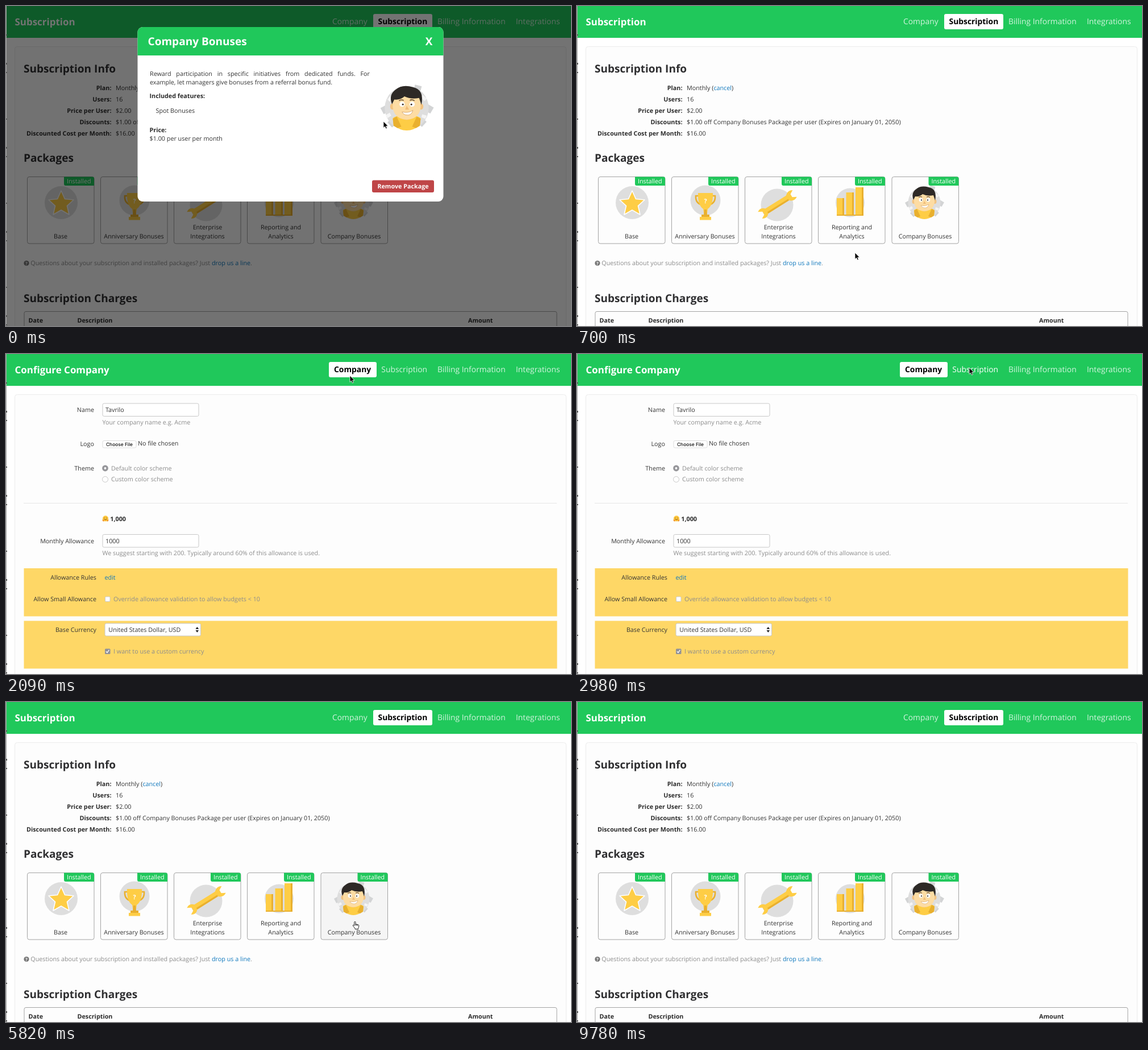
An HTML page that plays this animation: 994 by 563 pixels, repeating every 9.88 s.

```html
<!DOCTYPE html>
<html lang="en">
<head>
<meta charset="utf-8">
<title>Subscription packages</title>
<style>
html, body { margin: 0; width: 100%; height: 100%; overflow: hidden; background: #fff; }
svg { display: block; }
text, p { font: 10.78px "Open Sans", sans-serif; text-rendering: geometricPrecision; }
text { fill: #333; white-space: pre; }
p { margin: 0; color: #333; line-height: 15.4px; white-space: nowrap; }
.justify { text-align: justify; text-align-last: justify; white-space: normal; }
.b { font-weight: 700; fill: #2b2b2b; }
.end { text-anchor: end; }
.mid { text-anchor: middle; }
.h { font-size: 19.05px; font-weight: 700; fill: #2f2f31; }
.title { font-size: 16.94px; font-weight: 700; fill: #fff; }
.nav { font-size: 13.86px; fill: #d2f4de; }
.active { font-weight: 700; fill: #000; }
.over-company .to-company, .over-subscription .to-subscription { fill: #fff; }
.link { fill: #0f78bd; }
.mute { fill: #8c8c8c; }
.white { fill: #fff; }
.green { fill: #20c85b; }
.box { fill: #fff; stroke: #c8c8c8; }
.frame { fill: var(--bg, #fdfdfd); stroke: #a3a3a3; }
.over-card #bonuses { --bg: #f5f5f5; }
.disc { fill: #dedede; }
.gold { fill: #fecd45; }
.dark { fill: #e9b02f; }
.small { font: 500 8.4px Inter, sans-serif; fill: #111; }
</style>
</head>
<body>
<svg id="stage" width="994" height="563" viewBox="0 0 994 563">
<defs>
  <g id="card">
    <rect class="frame" x=".5" y=".5" width="117.5" height="117.5" rx="3.5"/>
    <path class="green" d="M65 .5H115a3 3 0 0 1 3 3V16H68a3 3 0 0 1-3-3z"/>
    <text class="white" x="70" y="12">Installed</text>
  </g>
  <g id="person">
    <g fill="#d3d4d5">
      <rect x="-30" y="-16" width="13" height="9" transform="rotate(-28)"/>
      <rect x="-31" y="-3" width="13" height="9" transform="rotate(-42)"/>
      <rect x="17" y="-18" width="13" height="9" transform="rotate(30)"/>
      <rect x="18" y="-4" width="13" height="9" transform="rotate(42)"/>
      <rect x="3" y="-32" width="9" height="11" transform="rotate(14)"/>
    </g>
    <circle class="disc" r="28.5"/>
    <path fill="#fff" opacity=".7" d="M-25-11l4-5 3 3-4 5zM21-17l5 5-3 3-5-5zM-27 9l5-3 2 4-5 3zM20 8l6 2-2 4-5-2z"/>
    <path class="gold" d="M-18 13Q-13 9 0 10 13 9 18 13L17 22Q9 29 0 29-9 29-17 22z"/>
    <path class="dark" d="M-18 14l5-3 6 13-5 2-5-3zM18 14l-5-3-6 13 5 2 5-3z"/>
    <path fill="#f3c482" d="M-6 8H6V13Q0 18-6 13z"/>
    <ellipse cx="-18.5" cy="-2" rx="3" ry="4" fill="#f3c482"/>
    <ellipse cx="18.5" cy="-2" rx="3" ry="4" fill="#f3c482"/>
    <path fill="#fddca3" d="M-18-16H18V-1Q17 9 9 13 0 17-9 13-17 9-18-1z"/>
    <path fill="#2d2926" d="M-19-5Q-24-17-14-24-6-31 8-27 23-24 19-4L16-13Q5-11-3-15-8-10-16-11z"/>
    <g fill="#fff"><circle cx="-6" cy="-5" r="3.4"/><circle cx="7" cy="-5" r="3.4"/></g>
    <g fill="#3b3027"><circle cx="-5" cy="-4.6" r="1.1"/><circle cx="6" cy="-4.6" r="1.1"/></g>
    <path fill="none" stroke="#4a3828" d="M-10-9.5q3-2 6-.4M4-10q3-1.5 6 .5"/>
    <path fill="#f0bd78" d="M0-3l3 5H-2z"/>
    <path fill="#fff" stroke="#c99255" stroke-width=".5" d="M-6 5Q2 7 8 3 6 10 0 9-4 9-6 5z"/>
  </g>
  <path id="arrow" d="M0 0V11.4L2.6 9 4.4 13 6.4 12.2 4.7 8.2H8.2z" stroke="#fff" stroke-width=".8"/>
  <path id="hand" fill="#fff" stroke="#111" stroke-width=".9" stroke-linejoin="round"
    d="M-1.2 7.5V1.5a1.1 1.1 0 0 1 2.2 0V5l1.7.1 1.7.4 1.6.5q.8.4.8 1.4l-.4 3-.9 1.7v1.5H.1v-1.4L-1.8 10-3.6 7.7q-.4-1.5 1-1.4zM1 5V7.4M2.8 5.3V7.4M4.5 5.6V7.6"/>
  <path id="radio" class="box" d="M-5 0a5 5 0 0 1 10 0a5 5 0 0 1-10 0z"/>
</defs>

<rect width="994" height="563" fill="#fff"/>
<rect class="green" width="994" height="56"/>
<rect x="15.5" y="71.5" width="970" height="510" rx="4" fill="#fdfdfd" stroke="#ececec"/>

<g id="subscription">
  <text class="title" x="15.5" y="33.5">Subscription</text>
  <rect class="white" x="646" y="14" width="104" height="27" rx="3"/>
  <text class="nav to-company" x="574" y="32">Company</text>
  <text class="nav active" x="654.5" y="32">Subscription</text>

  <text class="h" x="31" y="117">Subscription Info</text>
  <g class="end">
    <text class="b" x="185.5" y="147.5">Plan:</text>
    <text class="b" x="185.5" y="167.5">Users:</text>
    <text class="b" x="185.5" y="187.5">Price per User:</text>
    <text class="b" x="185.5" y="207.5">Discounts:</text>
    <text class="b" x="185.5" y="227.5">Discounted Cost per Month:</text>
  </g>
  <text x="193" y="147.5">Monthly (<tspan class="link">cancel</tspan>)</text>
  <text x="193" y="167.5">16</text>
  <text x="193" y="187.5">$2.00</text>
  <text x="193" y="207.5">$1.00 off Company Bonuses Package per user (Expires on January 01, 2050)</text>
  <text x="193" y="227.5">$16.00</text>

  <text class="h" x="31" y="273.5">Packages</text>
  <g transform="translate(37 300)">
    <use href="#card"/>
    <circle class="disc" cx="60" cy="46" r="29"/>
    <path class="gold" stroke="#fff" stroke-width="1.6" stroke-linejoin="round"
      d="M60 25L66.5 39.5 82 41 70.5 51.7 74 67 60 59 46 67 49.5 51.7 38 41 53.5 39.5z"/>
    <text class="mid" x="59" y="108.5">Base</text>
  </g>
  <g transform="translate(166 300)">
    <use href="#card"/>
    <circle class="disc" cx="60" cy="42" r="26.5"/>
    <path fill="none" stroke="#e9b02f" stroke-width="2.6" d="M49 34H43Q42 47 54 50M71 34H77Q78 47 66 50"/>
    <path class="gold" d="M47 29H73Q74 50 64 57L62 69H58L56 57Q46 50 47 29z"/>
    <path class="dark" d="M58 58H62L63 68H57zM53 67H67V72H53z"/>
    <path class="gold" d="M50 71H70V76.5H50z"/>
    <text class="b mid white" x="60" y="47" style="fill:#fff">?</text>
    <text class="mid" x="59" y="108.5">Anniversary Bonuses</text>
  </g>
  <g transform="translate(295 300)">
    <use href="#card"/>
    <circle class="disc" cx="57" cy="50" r="28.5"/>
    <g transform="translate(57.5 49) rotate(-32)">
      <path class="gold" d="M-22-5Q-28-12-36-7L-29-3V3L-36 7Q-28 12-22 5H21Q28 12 36 7L29 3V-3L36-7Q28-12 21-5z"/>
      <path class="dark" d="M-22 2H21V5H-22z"/>
    </g>
    <text class="mid" x="59.5" y="393" transform="translate(0 -300)">Enterprise</text>
    <text class="mid" x="59.5" y="108.5">Integrations</text>
  </g>
  <g transform="translate(424 300)">
    <use href="#card"/>
    <circle class="disc" cx="56.5" cy="46" r="25.5"/>
    <path class="gold" d="M33 38H46V67H33zM49.5 28H63V67H49.5zM66 19H80V67H66z"/>
    <path class="dark" d="M43 38H46V67H43zM60 28H63V67H60zM77 19H80V67H77zM33 67H80V69H33z"/>
    <text class="mid" x="59.5" y="93">Reporting and</text>
    <text class="mid" x="59.5" y="108.5">Analytics</text>
  </g>
  <g id="bonuses" transform="translate(553.5 300)">
    <use href="#card"/>
    <use href="#person" x="57.5" y="46"/>
    <text class="mid" x="59" y="108.5">Company Bonuses</text>
  </g>

  <circle cx="36" cy="452.5" r="4.6" fill="#777"/>
  <text class="b mid" x="36" y="455.5" style="font-size:8px;fill:#fff">?</text>
  <text class="mute" x="43.3" y="456.3">Questions about your subscription and installed packages? Just <tspan class="link">drop us a line</tspan>.</text>

  <text class="h" x="31" y="520.5">Subscription Charges</text>
  <rect class="frame" x="32" y="537.5" width="937" height="60" rx="3"/>
  <text class="b" x="39.5" y="556.8">Date</text>
  <text class="b" x="125.5" y="556.8">Description</text>
  <text class="b" x="813" y="556.8">Amount</text>
</g>

<g id="company">
  <text class="title" x="15.5" y="33.5">Configure Company</text>
  <rect class="white" x="568" y="14" width="84" height="27" rx="3"/>
  <text class="nav active" x="577" y="32">Company</text>
  <text class="nav to-subscription" x="660.3" y="32">Subscription</text>

  <text class="end" x="155" y="102">Name</text>
  <rect class="box" x="170" y="87" width="169" height="22.5" rx="2.5"/>
  <text x="175" y="102">Tavrilo</text>
  <text class="mute" x="169.5" y="123.7">Your company name e.g. Acme</text>
  <text class="end" x="155" y="162">Logo</text>
  <rect x="170" y="152.5" width="59" height="12.5" rx="2.5" fill="#fff" stroke="#dcdcdc"/>
  <text class="small mid" x="199.5" y="161.5">Choose File</text>
  <text x="232" y="161.3">No file chosen</text>
  <text class="end" x="155" y="205">Theme</text>
  <circle cx="174.5" cy="201" r="5.4" fill="#97979b"/>
  <circle class="white" cx="174.5" cy="201" r="1.9"/>
  <text class="mute" x="185" y="204.5">Default color scheme</text>
  <use href="#radio" x="174.5" y="220.5"/>
  <text class="mute" x="185" y="223.7">Custom color scheme</text>
  <path stroke="#e6e6e6" d="M31 262.5H969"/>

  <circle cx="175" cy="289.5" r="5" fill="#fdc53a"/>
  <path fill="none" stroke="#7a4b16" stroke-width=".9" d="M172.5 288.3h1.2M176.3 288.3h1.2M172.5 290.5q2.5 2.6 5 0"/>
  <path fill="#f0932b" d="M169.5 291l3 1.2v2.6l-2.5-.8zM180.5 291l-3 1.2v2.6l2.5-.8z"/>
  <text class="b" x="183.3" y="294.3">1,000</text>
  <text class="end" x="155" y="332.5">Monthly Allowance</text>
  <rect class="box" x="170" y="317.5" width="169" height="22.5" rx="2.5"/>
  <text x="175" y="332.7">1000</text>
  <text class="mute" x="169.5" y="354">We suggest starting with 200. Typically around 60% of this allowance is used.</text>

  <path fill="#fed766" d="M31.5 377H969.5V461.5H31.5zM31.5 469.5H969.5V553.5H31.5z"/>
  <text class="end" x="159" y="396.5">Allowance Rules</text>
  <text class="link" x="173.5" y="396.5">edit</text>
  <text class="end" x="159" y="435">Allow Small Allowance</text>
  <rect class="box" x="174.5" y="427" width="8.5" height="8.5" rx="1.5"/>
  <text class="mute" x="189" y="435">Override allowance validation to allow budgets &lt; 10</text>
  <text class="end" x="159" y="488.5">Base Currency</text>
  <rect class="box" x="174" y="474" width="168.5" height="22" rx="2.5"/>
  <text x="180.3" y="488.7">United States Dollar, USD</text>
  <path fill="#222" d="M333.5 484l2.8-4 2.8 4zM333.5 486l2.8 4 2.8-4z"/>
  <rect x="174" y="518.5" width="9.5" height="9.5" rx="1.5" fill="#929297"/>
  <path fill="none" stroke="#fff" stroke-width="1.3" d="M176 523.3l2 2.2 3.4-4.8"/>
  <text class="mute" x="189" y="527">I want to use a custom currency</text>
</g>

<text class="nav" x="759" y="32">Billing Information</text>
<text class="nav" x="897" y="32">Integrations</text>

<g id="modal">
  <rect width="994" height="563" opacity=".55"/>
  <rect x="231.5" y="37" width="538" height="307" rx="9" fill="#fff"/>
  <path class="green" d="M231.5 87V46a9 9 0 0 1 9-9H760.500a9 9 0 0 1 9 9V87z"/>
  <text class="h" x="249.5" y="68.500" style="fill:#fff">Company Bonuses</text>
  <text class="h mid" x="744" y="68.500" style="fill:#fff">X</text>
  <foreignObject x="253" y="111.800" width="387" height="34">
    <p class="justify">Reward participation in specific initiatives from dedicated funds. For</p>
    <p>example, let managers give bonuses from a referral bonus fund.</p>
  </foreignObject>
  <text class="b" x="252.500" y="162">Included features:</text>
  <text x="263.500" y="188">Spot Bonuses</text>
  <text class="b" x="252.500" y="221.700">Price:</text>
  <text x="252.500" y="237.300">$1.00 per user per month</text>
  <use href="#person" transform="translate(705 179.500) scale(1.36)"/>
  <rect x="644" y="306.500" width="109" height="21.500" rx="3" fill="#bf4547"/>
  <text class="b mid" x="698.500" y="321.200" style="fill:#fff">Remove Package</text>
</g>

<path stroke="#a9a9a9" d="M.5 0V563"/>
<path stroke="#555" stroke-width="2" stroke-dasharray="2 48 3 13 2 80" d="M1 50V563"/>

<g id="cursor"><use id="pointer" href="#arrow"/></g>
</svg>

<script>
const LOOP = 9880;
const $ = id => document.getElementById(id);
const stage = $('stage'), cursor = $('cursor'), pointer = $('pointer');

// Cursor moves: first step, last step, step count, target, optional curve control
const moves = [
  [0, 0, 1, 664, 203],
  [110, 110, 1, 684, 164],
  [320, 320, 1, 623, 277],
  [490, 490, 1, 474, 477],
  [700, 700, 1, 489, 434],
  [820, 820, 1, 631, 1],
  [1210, 1560, 5, 605, 28],
  [2090, 2090, 1, 605, 38],
  [2360, 2710, 5, 690, 24, 590, 140],
  [3690, 4210, 7, 610, 326, 690, 200],
  [4930, 5560, 8, 624, 385, 740, 390],
  [5730, 5730, 1, 619, 386],
  [5820, 5820, 1, 614, 386],
  [6470, 6710, 3, 680, 366],
  [7340, 7750, 5, 604, 375, 660, 325],
  [8280, 8280, 1, 601, 372],
  [8550, 8950, 5, 877, 508, 680, 400],
  [9160, 9160, 1, 932, 527],
  [9280, 9280, 1, -50, -50]
];

const steps = [];
let px = 0, py = 0;
for (const [from, to, n, x, y, cx = (px + x) / 2, cy = (py + y) / 2] of moves) {
  for (let k = 1; k <= n; k++) {
    const u = k / n, v = 1 - u;
    const bend = (a, c, b) => v * v * a + 2 * u * v * c + u * u * b;
    steps.push({
      t: n > 1 ? from + (to - from) * (k - 1) / (n - 1) : from,
      x: Math.round(bend(px, cx, x)),
      y: Math.round(bend(py, cy, y))
    });
  }
  [px, py] = [x, y];
}

const within = (v, a, b) => v >= a && v <= b;

function hit({ x, y }, company) {
  if (within(y, 14, 41)) {
    if (within(x, 568, company ? 652 : 644)) return 'company';
    if (within(x, company ? 654 : 646, 750)) return 'subscription';
  }
  return !company && within(x, 553, 672) && within(y, 300, 418) ? 'card' : '';
}

const show = (id, on) => { $(id).style.display = on ? '' : 'none'; };

function draw(t) {
  const company = within(t, 2090, 3249.99);
  const loading = within(t, 2090, 2359.99) || within(t, 2980, 3419.99);
  const at = steps.findLast(s => s.t <= t + 0.01) || steps[0];
  const over = hit(at, company);
  show('company', company);
  show('subscription', !company);
  show('modal', t < 700);
  stage.setAttribute('class', over ? 'over-' + over : '');
  pointer.setAttribute('href', over && !loading ? '#hand' : '#arrow');
  cursor.setAttribute('transform', `translate(${at.x} ${at.y})`);
}

const start = performance.now();
function tick() {
  draw((performance.now() - start) % LOOP);
  requestAnimationFrame(tick);
}
tick();
</script>
</body>
</html>
```
